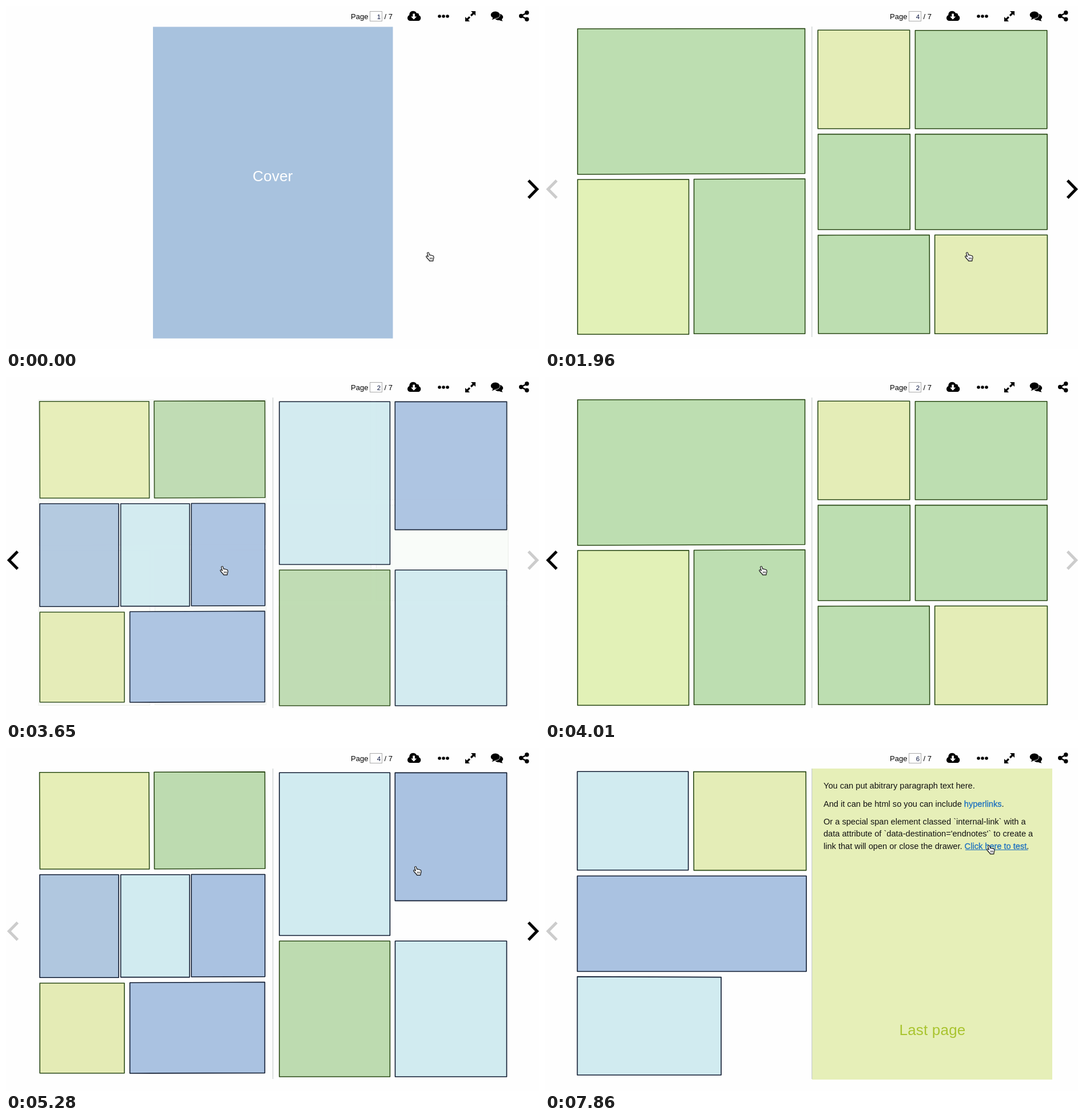
These frames come from a looping animation (932x601 px, 8 s). An HTML page:

```html
<!DOCTYPE html>
<html lang="en">
<head>
<meta charset="utf-8">
<title>Comic reader</title>
<style>
  html, body { margin: 0; width: 100%; height: 100%; overflow: hidden; background: #fefefe; }
  svg { display: block; font-family: "Liberation Sans", Arial, sans-serif; }
  .bar { font-size: 13px; }
  .body { font-size: 14.6px; fill: #111; }
  .big { font-size: 26px; text-anchor: middle; letter-spacing: .2px; }
  .link { fill: #1c70c0; stroke: #1c70c0; stroke-width: .3px; }
  .arrow { fill: none; stroke-width: 5; }
</style>
</head>
<body>
<svg width="932" height="601" viewBox="0 0 932 601">
  <g class="bar">
    <text x="603" y="22.5">Page</text>
    <rect x="636.5" y="9.5" width="21" height="17" fill="#fff" stroke="#aaa"/>
    <text id="num" x="652" y="22.5" font-size="11.5" text-anchor="middle" fill="#0b1640"></text>
    <text x="661.5" y="22.5">/ 7</text>
  </g>

  <g id="icons">
    <path d="M707 26C704 26 702 23.8 702 21C702 18.6 703.4 16.8 705.3 16C705 12 707.7 8.8 711.8 8.8C714.7 8.8 717 10.3 718 12.8C720.2 11.9 722.6 13.6 722 16.3C724.2 17 725.3 18.8 725.3 21C725.3 24 723.2 26 720.4 26Z"/>
    <path d="M711.3 13.5h3.6v5h3.2l-5 5.2-5-5.2h3.2z" fill="#fefefe"/>
    <circle cx="758" cy="18" r="2.8"/><circle cx="765" cy="18" r="2.8"/><circle cx="772" cy="18" r="2.8"/>
    <path d="M821 9v8l-8-8zM803 27v-8l8 8z"/>
    <path d="M806 24l4.8-4.8M813 17l5-5" stroke="#000" stroke-width="3.2"/>
    <ellipse cx="861.7" cy="19.3" rx="7.5" ry="5.8"/>
    <path d="M862 24.5q3 1.8 6.8 2q-1.8-1.4-2-4z"/>
    <ellipse cx="855.6" cy="15.5" rx="7.9" ry="6.1" stroke="#fefefe" stroke-width="1.4" paint-order="stroke"/>
    <path d="M851.5 19.5q-.2 3-2 4.4q4-.2 6.5-2.6z"/>
    <path d="M910.6 12l-10 5.5 10 5.6" fill="none" stroke="#000" stroke-width="2.5"/>
    <circle cx="900.7" cy="17.5" r="3.7"/><circle cx="910.8" cy="11.8" r="3.7"/><circle cx="910.8" cy="23.2" r="3.7"/>
  </g>

  <g id="cover">
    <rect x="257" y="36.5" width="419.5" height="546" fill="#a8c2de"/>
    <text class="big" x="466.5" y="307" fill="#fff">Cover</text>
  </g>
  <g id="first"></g>
  <g id="second"></g>
  <g id="third">
    <rect x="467" y="36" width="420" height="545" fill="#e6efb8"/>
    <g class="body">
      <text x="487" y="71.2">You can put abitrary paragraph text here.</text>
      <text x="487" y="102.5">And it can be html so you can include <tspan class="link">hyperlinks</tspan>.</text>
      <text x="487" y="133.7">Or a special span element classed `internal-link` with a</text>
      <text x="487" y="155.2">data attribute of `data-destination='endnotes'` to create a</text>
      <text x="487" y="176.7">link that will open or close the drawer. <tspan class="link">Click here to test</tspan>.</text>
      <path id="under" d="M735 178.5h109.5" stroke="#1c70c0" stroke-width="1.1"/>
    </g>
    <text class="big" x="677.5" y="503" fill="#a9c42f">Last page</text>
  </g>

  <path id="left" class="arrow" d="M20.3 305.8L5.3 321L20.3 336.2"/>
  <path id="right" class="arrow" d="M913.7 305.8L928.5 321L913.7 336.2"/>

  <g id="hand">
    <path d="M3 1.2C3.8.3 5.2.6 5.5 2L6.6 5.6C7.4 4.9 8.6 5.1 9 6C9.8 5.5 10.9 5.7 11.3 6.6C12.5 6.2 13.6 6.9 13.8 8.2C14.1 10 13.9 11.5 13 13L12.8 15.5H6.5L6 14.2C4.5 13 2.8 10.6 1 8.6C.2 7.6 1 6.6 2.2 6.9L4.4 8.4L2.6 2.6C2.4 2 2.6 1.5 3 1.2Z"
      id="palm" fill="#fff" stroke="#111" stroke-width="1.1" stroke-linejoin="round"/>
    <path d="M7.4 9.6l.2 3.4M9.4 9.6l.1 3.4M11.4 9.6v3.4" stroke="#111" stroke-width=".8"/>
  </g>
</svg>
<script>
const LOOP = 8000;
const $ = id => document.getElementById(id);
const GREEN = '#2b4a17', NAVY = '#0e1a30';
const leaf = '#bddeb1', moss = '#bddbb0', lime = '#e4edb7';
const sky = '#d1ebf0', blue = '#aac2e1';

function make(parent, tag, attrs) {
  const el = document.createElementNS('http://www.w3.org/2000/svg', tag);
  for (const k in attrs) el.setAttribute(k, attrs[k]);
  parent.append(el);
  return el;
}

// Panel edges, then optional offsets of the right and bottom corners from true
function panel(id, ink, fill, l, t, r, b, topTilt = 0, botTilt = 0, lean = 0) {
  make($(id), 'path', {
    d: `M${l} ${t}L${r} ${t + topTilt}L${r + lean} ${b + botTilt}L${l + lean} ${b}Z`,
    fill, stroke: ink, 'stroke-width': 1.6, 'stroke-linejoin': 'round'
  });
}

panel('first', GREEN, leaf, 57, 40, 454.5, 295, -.5, -1.5);
panel('first', GREEN, '#e2f1b7', 57, 304, 251.5, 575.3, -.3);
panel('first', GREEN, leaf, 260.5, 303.5, 454.7, 574.3, -.8);
panel('first', GREEN, lime, 477.2, 42.3, 637.7, 215);
panel('first', GREEN, leaf, 647.4, 42.7, 877.8, 215);
panel('first', GREEN, leaf, 477.5, 224.6, 638.3, 391.7);
panel('first', GREEN, leaf, 647.5, 224.6, 878.2, 391.7);
panel('first', GREEN, leaf, 477.5, 401.6, 672.2, 574, -.4, 0, .5);
panel('first', GREEN, lime, 681.6, 401.2, 878.4, 574.2);

panel('second', GREEN, '#e6eeb7', 58.6, 42.7, 250, 212.2, 0, 0, .7);
panel('second', GREEN, moss, 259, 42.2, 452.6, 212, -.3, -.8, .5);
panel('second', NAVY, '#b0c7df', 59, 222, 197, 402.2);
panel('second', NAVY, sky, 200.6, 222, 321, 401.6);
panel('second', NAVY, blue, 324.2, 221.5, 452.8, 401, 0, -.4);
panel('second', GREEN, '#e4ebb5', 59.2, 412, 207, 569.8);
panel('second', NAVY, blue, 216.6, 411.2, 452.5, 570, -.9, -.6);
panel('second', NAVY, sky, 478, 43.2, 671.4, 328.5);
panel('second', NAVY, blue, 680.3, 43.4, 875.6, 267.6);
panel('second', GREEN, moss, 478, 338.2, 671.4, 576);
panel('second', NAVY, sky, 680.5, 338.3, 875.5, 576);

panel('third', NAVY, sky, 56.5, 41.2, 250.6, 214);
panel('third', GREEN, lime, 259.8, 41.6, 456.2, 214.4, 0, 0, .5);
panel('third', NAVY, blue, 56.5, 224.2, 457, 391.5);
panel('third', NAVY, sky, 56.5, 400.6, 308, 573, 1);

for (const id of ['first', 'second', 'third'])
  make($(id), 'path', { d: 'M466.7 36V580', stroke: '#c8cccc', 'stroke-width': 1.2 });

const clamp = v => Math.max(0, Math.min(1, v));
const ease = (t, a, b) => { const p = clamp((t - a) / (b - a)); return p * p * (3 - 2 * p); };

// Page turns: number change, fade start, fade end, scene, page number
const turns = [
  [500, 560, 1030, 'first', 2],
  [1960, 2040, 2450, 'second', 4],
  [3590, 3590, 4010, 'first', 2],
  [4870, 4870, 5280, 'second', 4],
  [6000, 6000, 6400, 'third', 6]
];

// Hand moves: start, end, x, y
const moves = [
  [2810, 3270, 374, 331],
  [4130, 4510, 712, 207],
  [7450, 7800, 772, 170]
];

function drawPages(t) {
  const alpha = { cover: 1, first: 0, second: 0, third: 0 };
  let shown = 'cover', page = 1;
  for (const [at, from, to, scene, n] of turns) {
    if (t < at) break;
    const p = ease(t, from, to);
    alpha[shown] = 1 - p;
    alpha[scene] = p;
    shown = scene;
    page = n;
  }
  for (const id in alpha) {
    $(id).style.opacity = alpha[id];
    $(id).style.display = alpha[id] ? '' : 'none';
  }
  if ($('num').textContent !== String(page)) $('num').textContent = page;
}

function drawArrow(id, dark, opacity) {
  const v = Math.round(204 * (1 - dark));
  $(id).style.stroke = `rgb(${v},${v},${v})`;
  $(id).style.opacity = opacity;
}

function drawHand(t) {
  let x = 734, y = 431;
  for (const [a, b, tx, ty] of moves) {
    const p = ease(t, a, b);
    x += (tx - x) * p;
    y += (ty - y) * p;
  }
  $('hand').setAttribute('transform', `translate(${x.toFixed(2)} ${y.toFixed(2)})`);
}

function draw(t) {
  drawPages(t);
  const back = ease(t, 3050, 3270) - ease(t, 4260, 4510);
  const end = ease(t, 6000, 6400);
  drawArrow('left', back + end - ease(t, 7640, 7860), ease(t, 500, 900));
  drawArrow('right', 1 - back, 1 - end);
  $('under').style.opacity = t >= 7640 ? 1 : 0;
  drawHand(t);
}

$('palm').style.filter = 'drop-shadow(0 1px .6px rgba(0,0,0,.3))';
const start = performance.now();
function tick() {
  draw((performance.now() - start) % LOOP);
  requestAnimationFrame(tick);
}
tick();
</script>
</body>
</html>
```
